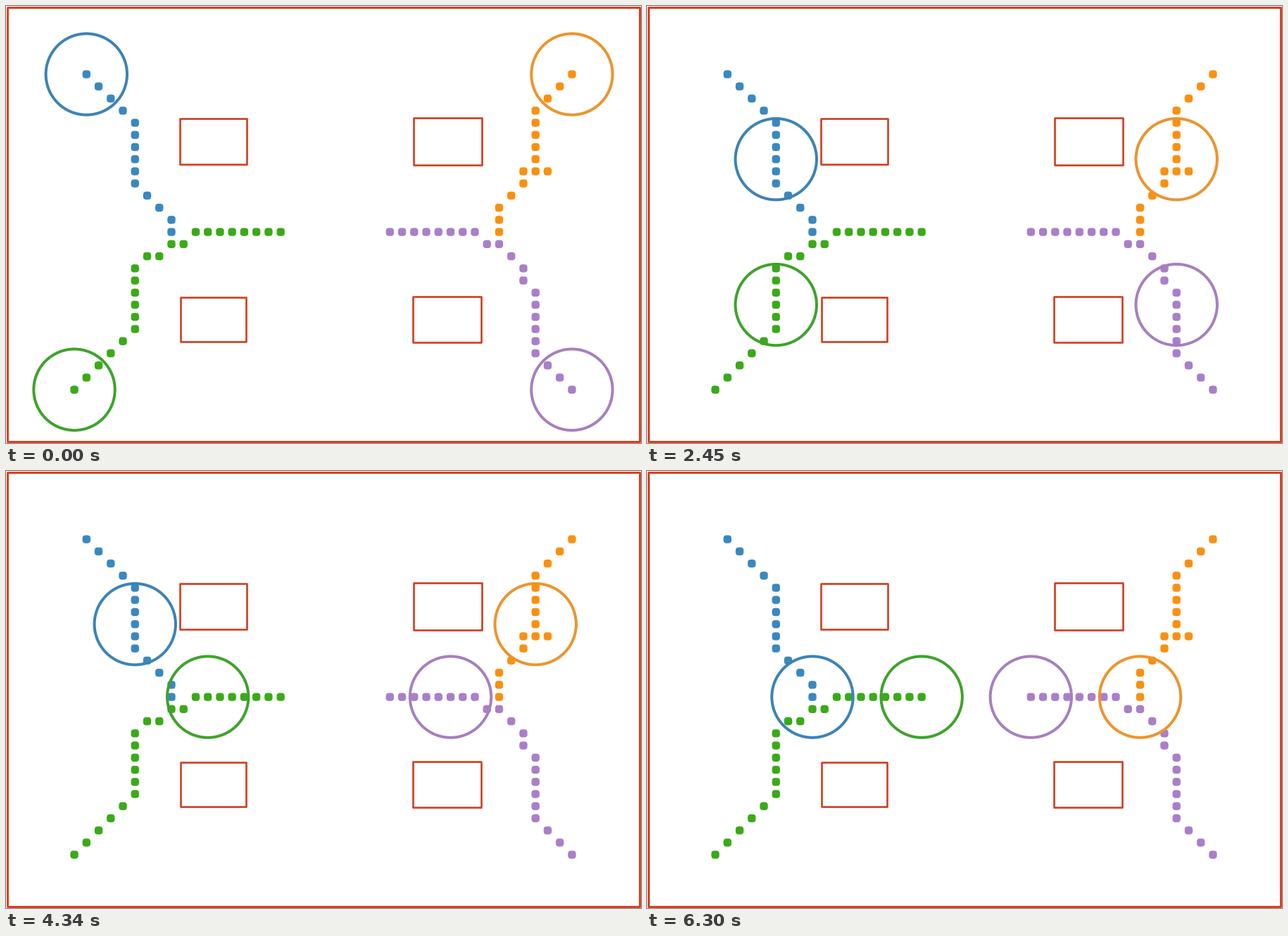
Write a matplotlib script that moves like this. It is 902x621 px and loops after 6.51 s.

```python
import matplotlib.pyplot as plt
from matplotlib.animation import FuncAnimation
from matplotlib.patches import Circle, FancyBboxPatch, Rectangle

W, H, DPI = 902, 621, 100
FRAMES, INTERVAL = 93, 70
LEAD, HOLD = 12, 3              # frames before the first step, frames per step
CELL, X0, Y0 = 17.24, 114.3, 97.0
RADIUS, DOT = 57.7, 11.4

# Start cell, moves as numeric keypad directions (5 waits), dot and ring colour
ROBOTS = [
    ((0, 0), "3333222" + "5" * 11 + "223332", "#3a88c0", "#3c83b6"),
    ((40, 0), "1112222" + "5" * 9 + "34421122", "#fa9010", "#ec942e"),
    ((-1, 26), "9999988888" + "96969" + "6" * 7, "#3aaa18", "#3fa22c"),
    ((40, 26), "77788888" + "787747" + "4" * 7, "#a97fc9", "#a680be"),
]

OBSTACLES = [
    (247, 160, 342, 225),
    (579, 159, 676, 225.5),
    (248, 413.5, 341, 477),
    (578, 412.5, 674.5, 477.5),
]


def px(pt):
    return pt * 72 / DPI


def walk(start, moves):
    col, row = start
    cells = [start]
    for key in moves:
        r, c = divmod(int(key) - 1, 3)
        col, row = col + c - 1, row + 1 - r
        cells.append((col, row))
    return cells


def to_xy(cell):
    return X0 + CELL * cell[0], Y0 + CELL * cell[1]


fig = plt.figure(figsize=(W / DPI, H / DPI), dpi=DPI, facecolor="white")
ax = fig.add_axes([0, 0, 1, 1])
ax.set_xlim(0, W)
ax.set_ylim(H, 0)
ax.axis("off")


def add_box(x0, y0, x1, y1, color, width):
    ax.add_patch(Rectangle((x0, y0), x1 - x0, y1 - y0, fill=False,
                           ec=color, lw=px(width), joinstyle="round"))


def add_dot(cell, color):
    x, y = to_xy(cell)
    ax.add_patch(FancyBboxPatch(
        (x - DOT / 2, y - DOT / 2), DOT, DOT,
        boxstyle="round,pad=0,rounding_size=4.4", fc=color, ec="none", zorder=2))


add_box(2, 1.8, 900, 619.2, "#dc3f22", 3)
for box in OBSTACLES:
    add_box(*box, "#cf4224", 2.7)

paths, rings = [], []
for start, moves, dot_color, ring_color in ROBOTS:
    path = walk(start, moves)
    for cell in set(path):
        add_dot(cell, dot_color)
    ring = Circle(to_xy(start), RADIUS, fill=False, ec=ring_color,
                  lw=px(4), zorder=3)
    ax.add_patch(ring)
    paths.append(path)
    rings.append(ring)


def update(frame):
    step = max(0, (frame - LEAD) // HOLD)
    for path, ring in zip(paths, rings):
        ring.center = to_xy(path[min(step, len(path) - 1)])
    return rings


anim = FuncAnimation(fig, update, frames=FRAMES, interval=INTERVAL,
                     repeat=True, repeat_delay=0, blit=False)
plt.show()
```
